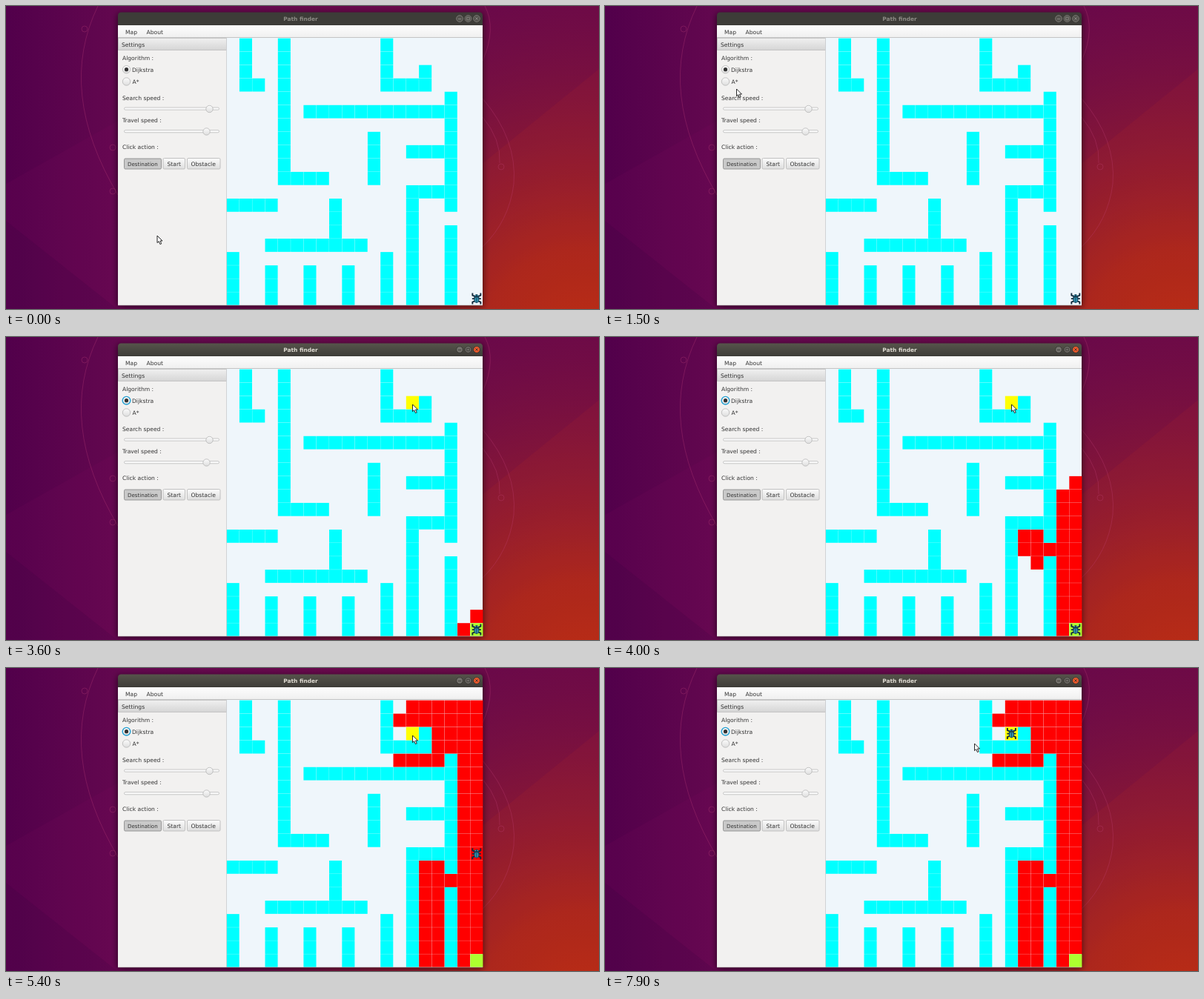
An HTML page that plays this animation: 800x409 px, repeating every 8 s.

```html
<!DOCTYPE html>
<html lang="en">
<head>
<meta charset="utf-8">
<title>Path finder</title>
<style>
html, body { margin: 0; width: 100%; height: 100%; overflow: hidden; background: #5a054c; }
svg { display: block; }
text { font: 7.6px "DejaVu Sans", sans-serif; fill: #333; text-rendering: geometricPrecision; }
.title { font-size: 7.4px; font-weight: bold; fill: #8d8b85; text-anchor: middle; }
.focused .title { fill: #e0dcd3; }
.bar { fill: #3d3c38; }
.focused .bar { fill: url(#barOn); }
.knob { fill: #54534e; stroke: #83817b; stroke-width: .8; }
.focused .knob { fill: #72706a; stroke: #34332f; }
.sign { fill: none; stroke: #91908a; stroke-width: .8; }
.focused .sign { stroke: #33322e; }
.focused .close { fill: #ee5a2c; }
.ring { display: none; fill: none; stroke: #24a3d6; stroke-width: 1.4; }
.focused .ring { display: inline; }
.ctl { fill: url(#button); stroke: #b5b5b5; stroke-width: .8; }
.wire { fill: none; stroke: #c2447c; stroke-opacity: .38; stroke-width: .8; }
</style>
</head>
<body>
<svg width="800" height="409" viewBox="0 0 800 409">
  <defs>
    <linearGradient id="dusk">
      <stop offset="0" stop-color="#52004b"/>
      <stop offset=".2" stop-color="#64084f"/>
      <stop offset="1" stop-color="#6d0a47"/>
    </linearGradient>
    <radialGradient id="glow" gradientUnits="userSpaceOnUse" cx="780" cy="470" r="480">
      <stop offset="0" stop-color="#bd2d10"/>
      <stop offset=".3" stop-color="#b02918" stop-opacity=".9"/>
      <stop offset="1" stop-color="#8a1a35" stop-opacity="0"/>
    </radialGradient>
    <linearGradient id="barOn" x2="0" y2="1">
      <stop offset="0" stop-color="#56544b"/>
      <stop offset="1" stop-color="#3c3b37"/>
    </linearGradient>
    <linearGradient id="menu" x2="0" y2="1">
      <stop offset="0" stop-color="#fdfdfd"/>
      <stop offset="1" stop-color="#efefef"/>
    </linearGradient>
    <linearGradient id="head" x2="0" y2="1">
      <stop offset="0" stop-color="#f0f0f0"/>
      <stop offset="1" stop-color="#d5d5d5"/>
    </linearGradient>
    <linearGradient id="button" x2="0" y2="1">
      <stop offset="0" stop-color="#fbfbfb"/>
      <stop offset="1" stop-color="#dedede"/>
    </linearGradient>
    <filter id="blur" x="-10%" y="-10%" width="120%" height="120%"><feGaussianBlur stdDeviation="4"/></filter>
  </defs>

  <g id="desktop">
    <rect width="800" height="409" fill="url(#dusk)"/>
    <rect width="800" height="409" fill="url(#glow)"/>
    <path d="M0 240 160 150V409H0Z" fill="#8a0f60" fill-opacity=".1"/>
    <path d="M0 290 150 409H0Z" fill="#30003c" fill-opacity=".14"/>
    <path d="M640 215 800 85V409H640Z" fill="#c03020" fill-opacity=".1"/>
    <g class="wire">
      <path d="M124 0Q68 115 151 255M646 0Q662 30 643 74M643 125Q690 180 685 240 679 290 643 325M643 150Q668 180 666 212"/>
      <circle cx="106" cy="31" r="4"/><circle cx="144" cy="191" r="4"/>
      <circle cx="144" cy="250" r="4"/><circle cx="668" cy="217" r="4"/>
    </g>
  </g>

  <g id="win">
    <rect x="150" y="10" width="494" height="396" rx="4" fill="#000" fill-opacity=".55" filter="url(#blur)"/>
    <path class="bar" d="M151 27V13q0-4.500 4.500-4.500H638.500q4.500 0 4.500 4.500V27Z"/>
    <text class="title" x="397.500" y="19.700">Path finder</text>
    <circle class="knob" cx="612" cy="17" r="4.400"/>
    <circle class="knob" cx="623.500" cy="17" r="4.400"/>
    <circle class="knob close" cx="635" cy="17" r="4.400"/>
    <path class="sign" d="M610 17.500h4M621.700 15.200h3.600v3.600h-3.600zM633.300 15.300l3.400 3.400m0-3.400-3.400 3.400"/>
    <rect x="151" y="26" width="492" height="378" fill="#f2f1f0"/>
    <rect x="151" y="26" width="492" height="17" fill="url(#menu)"/>
    <path d="M151 42.500H643" stroke="#c4c4c4"/>
    <text x="161" y="37.600">Map</text>
    <text x="189.500" y="37.600">About</text>
    <rect x="151.500" y="43.500" width="146" height="16" fill="url(#head)" stroke="#bdbdbd" stroke-width=".8"/>
    <text x="156" y="54.600">Settings</text>

    <text x="157" y="72.800">Algorithm :</text>
    <circle class="ctl" cx="162.500" cy="85.700" r="5.200"/>
    <circle class="ring" cx="162.500" cy="85.700" r="5.300"/>
    <circle cx="162.500" cy="85.700" r="2.600" fill="#333"/>
    <text x="170" y="88.800">Dijkstra</text>
    <circle class="ctl" cx="162.500" cy="102" r="5.200"/>
    <text x="170.500" y="105">A*</text>

    <text x="157" y="126.800">Search speed :</text>
    <rect x="159.500" y="137" width="128" height="3.200" rx="1.600" fill="#fafafa" stroke="#bcbcbc" stroke-width=".8"/>
    <circle class="ctl" cx="274.500" cy="139" r="4.700"/>
    <text x="157" y="157.200">Travel speed :</text>
    <rect x="159.500" y="167.600" width="128" height="3.200" rx="1.600" fill="#fafafa" stroke="#bcbcbc" stroke-width=".8"/>
    <circle class="ctl" cx="270.500" cy="169.500" r="4.700"/>

    <text x="157" y="193.200">Click action :</text>
    <rect x="159.500" y="206" width="50" height="14" rx="1.500" fill="#c9c9c9" stroke="#8e8e8e" stroke-width=".9"/>
    <text x="164" y="215.600" style="font-size:7.1px">Destination</text>
    <rect class="ctl" x="212" y="205.500" width="29.500" height="14.500" rx="1.500"/>
    <text x="217.500" y="215.700">Start</text>
    <rect class="ctl" x="244.500" y="205.500" width="44.500" height="14.500" rx="1.500"/>
    <text x="249.500" y="215.700">Obstacle</text>

    <rect x="297.500" y="43" width="345.500" height="361" fill="#eff6fb"/>
    <g id="cells"></g>
    <path d="M297.500 43V404" stroke="#c9cbcd" stroke-width=".8"/>
    <path d="M151 403.900H643" stroke="#b9b4b2" stroke-width=".7"/>
  </g>

  <g id="bug">
    <path d="M-2-3-5.500-4.500-5.500-7.500M2-3 5.500-4.500 5.500-7.500M-2 0H-6M2 0H6M-2 3-5.500 4.500-5.500 7.500M2 3 5.500 4.500 5.500 7.500" fill="none" stroke="#142b3c" stroke-width="1.900"/>
    <ellipse rx="3.700" ry="6" fill="#1b4358"/>
    <ellipse cy="1.500" rx="2.500" ry="3.600" fill="#3296b4"/>
    <path d="M-2.200-3H2.200M0-2V5" stroke="#153447" stroke-width=".8"/>
    <circle cx="-1.500" cy="-4.400" r=".8" fill="#49b5cc"/><circle cx="1.500" cy="-4.400" r=".8" fill="#49b5cc"/>
  </g>
  <path id="cursor" d="M0 0V9.600L2.200 7.700 3.900 11.600 5.700 10.800 4 7H7Z" fill="#fff" stroke="#111" stroke-width=".9"/>
</svg>
<script>
const $ = id => document.getElementById(id);
const SIZE = 20, W = 17.3, H = 18.03, LEFT = 297.5, TOP = 43.5;
const LOOP = 8000, TICK = 100, CLICK = 3600;
const START = [19, 19], GOAL = [14, 2];
const VISITED = 73;

// Walls as x, y, width, height in cells
const walls = [
  [1, 0, 1, 4], [2, 3, 1, 1], [4, 0, 1, 11], [5, 10, 3, 1], [12, 0, 1, 4],
  [13, 3, 3, 1], [15, 2, 1, 1], [6, 5, 11, 1], [17, 4, 1, 9], [11, 7, 1, 4],
  [14, 8, 3, 1], [14, 11, 3, 1], [14, 12, 1, 8], [17, 14, 1, 6], [0, 12, 4, 1],
  [8, 12, 1, 3], [3, 15, 8, 1], [0, 16, 1, 4], [3, 17, 1, 3], [6, 17, 1, 3],
  [9, 17, 1, 3], [12, 16, 1, 4]
];

// Pointer waypoints: time, x, y
const route = [
  [0, 204, 310], [400, 204, 310], [500, 203, 305], [600, 203, 305],
  [1200, 179, 118], [1400, 179, 118], [1500, 177.5, 112], [2300, 166, 85],
  [2400, 416, 128], [2600, 416, 128], [2700, 422, 127], [3000, 530, 102],
  [3100, 566, 94], [3300, 548.5, 91], [7600, 548.5, 91], [7900, 498.5, 102],
  [LOOP, 498.5, 102]
];

// Ticks on which the bug pauses, catching up on the next one
const pauses = [5000, 5500, 5700, 6000, 6500];

const key = (x, y) => y * SIZE + x;
const blocked = new Set();
for (const [x, y, w, h] of walls)
  for (let j = 0; j < h; j++)
    for (let i = 0; i < w; i++) blocked.add(key(x + i, y + j));

function addCell(x, y, fill) {
  const r = document.createElementNS("http://www.w3.org/2000/svg", "rect");
  const set = (name, value) => r.setAttribute(name, value);
  set("x", LEFT + x * W + .12);
  set("y", TOP + y * H + .12);
  set("width", W - .24);
  set("height", H - .24);
  set("fill", fill);
  $("cells").append(r);
  return r;
}

// Breadth-first order in which cells are reached
function search() {
  const seen = new Set(blocked).add(key(...START)).add(key(...GOAL));
  const queue = [START];
  for (let i = 0; queue.length <= VISITED; i++) {
    const [x, y] = queue[i];
    for (const [dx, dy] of [[0, -1], [-1, 0], [0, 1], [1, 0]]) {
      const nx = x + dx, ny = y + dy, k = key(nx, ny);
      if (nx < 0 || ny < 0 || nx >= SIZE || ny >= SIZE || seen.has(k)) continue;
      seen.add(k);
      queue.push([nx, ny]);
    }
  }
  return queue.slice(1, VISITED + 1);
}

for (const k of blocked) addCell(k % SIZE, Math.floor(k / SIZE), "#0ff");
const flood = search().map(([x, y]) => addCell(x, y, "#f00"));
const ends = [addCell(...START, "#adff2f"), addCell(...GOAL, "#ff0")];
const show = (el, on) => { el.style.display = on ? "" : "none"; };
const place = (el, x, y) => el.setAttribute("transform", `translate(${x} ${y})`);

function pointer(t) {
  const i = route.findIndex(p => p[0] > t);
  const [t0, x0, y0] = route[i - 1], [t1, x1, y1] = route[i];
  const f = (t - t0) / (t1 - t0);
  return [x0 + (x1 - x0) * f, y0 + (y1 - y0) * f];
}

// Up the right edge, left along the second row, one cell down
function bugCell(t) {
  if (t >= 7300) return GOAL;
  if (pauses.includes(t)) t -= TICK;
  const n = t < 4800 ? 0 : Math.min(23, (t - 4600) / TICK);
  return [START[0] - Math.max(0, n - 18), START[1] - Math.min(18, n)];
}

function draw(t) {
  const count = t < CLICK ? 0 : 28 + Math.floor((t - 4000) * .065 + 1e-6);
  flood.forEach((el, i) => show(el, i < count));
  ends.forEach(el => show(el, t >= CLICK));
  $("win").classList.toggle("focused", t >= 1900);
  const [x, y] = bugCell(t);
  place($("bug"), LEFT + (x + .5) * W, TOP + (y + .5) * H);
  place($("cursor"), ...pointer(t));
}

let last = -1;
function frame() {
  const t = Math.floor(performance.now() % LOOP / TICK) * TICK;
  if (t !== last) draw(last = t);
  requestAnimationFrame(frame);
}
frame();
</script>
</body>
</html>
```
